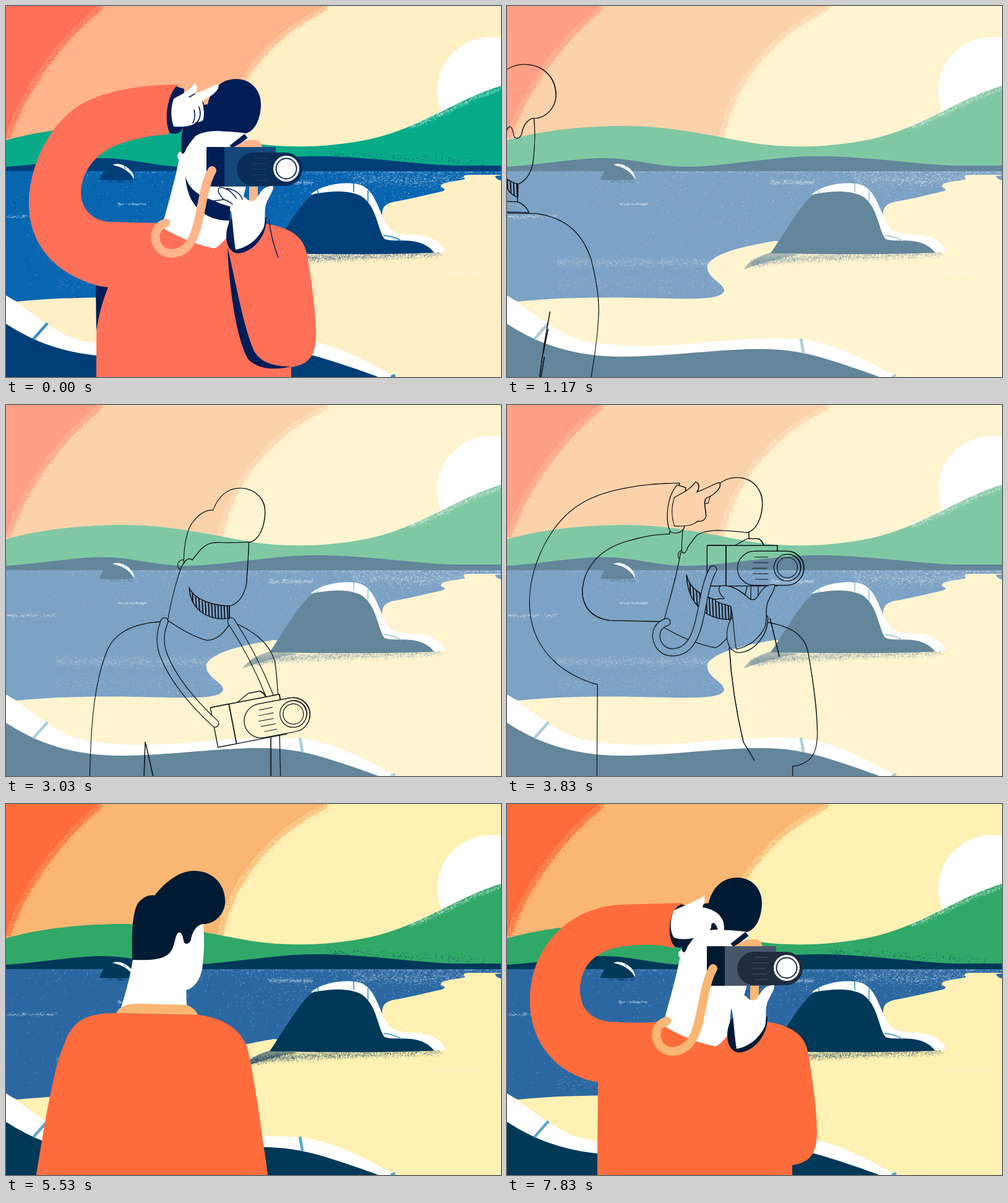
Animation, 800 px wide and 600 px high, one loop 8 s. Source, as an HTML page with a canvas:

```html
<!DOCTYPE html>
<html lang="en">
<head>
<meta charset="utf-8">
<title>Photographer by the bay</title>
<style>
html, body { margin: 0; width: 100%; height: 100%; overflow: hidden; background: #fff1b3; }
canvas { display: block; width: 100vw; height: 100vh; }
</style>
</head>
<body>
<canvas id="stage" width="800" height="600"></canvas>
<script>
const W = 800, H = 600, LOOP = 8000;

const looks = {
  finished: { red: '#ff7058', orange: '#ffb48a', cream: '#ffefc4', green: '#08ab88', navy: '#003e78', sea: '#0865b0',
    tick: '#3a8fc4', hair: '#001d56', grip: '#001d56', body: '#15487b', lens: '#0a2c58', details: true },
  sketch: { red: '#ff9f85', orange: '#fcd2ab', cream: '#fff4d0', green: '#80c8a4', navy: '#63869b', sea: '#7ca2c5',
    tick: '#a9cfd8', outline: true },
  flat: { red: '#ff6c3c', orange: '#fab673', cream: '#fff1b3', green: '#30a868', navy: '#003858', sea: '#2b68a2',
    tick: '#5ba6cb', hair: '#001b33', grip: '#001a30', body: '#47566b', lens: '#202b3d' }
};

const INK = '#0b0f14';
const makeCanvas = () => Object.assign(document.createElement('canvas'), { width: W, height: H });
const lerp = (a, b, t) => a + (b - a) * t;
const smooth = t => t * t * (3 - 2 * t);
const NUMBER = /-?\d+(\.\d+)?/g;

function mix(a, b, t) {
  const target = b.match(NUMBER);
  let i = 0;
  return a.replace(NUMBER, n => lerp(+n, +target[i++], t).toFixed(2));
}
function shift(path, dx, dy) {
  let i = 0;
  return path.replace(NUMBER, n => +n + (i++ % 2 ? dy : dx));
}

/* ---------- landscape ---------- */

function paintLandscape(look) {
  const canvas = makeCanvas(), c = canvas.getContext('2d');
  let seed = 7;
  const rand = () => (seed = (seed * 16807) % 2147483647) / 2147483647;
  const bell = () => rand() + rand() + rand() - 1.5;
  const fill = (color, d) => { c.fillStyle = color; c.fill(new Path2D(d)); };
  const line = (color, width, d) => { c.strokeStyle = color; c.lineWidth = width; c.stroke(new Path2D(d)); };
  const dot = (x, y, s) => c.fillRect(x, y, s, s);

  function edgeGrain(color, n, spread, size, [x0, y0, x1, y1, x2, y2, x3, y3]) {
    c.fillStyle = color;
    for (let i = 0; i < n; i++) {
      const t = rand(), u = 1 - t;
      const at = (a, b, d, e) => u * u * u * a + 3 * u * u * t * b + 3 * u * t * t * d + t * t * t * e;
      dot(at(x0, x1, x2, x3) + bell() * spread, at(y0, y1, y2, y3) + bell() * spread, size);
    }
  }
  function patch(color, n, x, y, w, h) {
    c.fillStyle = color;
    for (let i = 0; i < n; i++) c.fillRect(x + w * rand(), y + h * (.5 + bell() / 3), 1 + rand() * 2, 1);
  }
  // a solid area whose edge fades through a half-tone band into grain
  function softEdge(color, area, edge) {
    const [x, y, ...rest] = edge;
    fill(color, area);
    line(color + '88', 13, `M${x},${y}C${rest}`);
    edgeGrain(color + 'aa', 1300, 9, 1.3, edge);
  }

  c.fillStyle = look.cream;
  c.fillRect(0, 0, W, H);
  softEdge(look.orange, 'M0,0 H515 C430,40 360,115 341,214 L340,260 H0Z', [518, 0, 433, 40, 363, 115, 344, 214]);
  softEdge(look.red, 'M0,0 H148 C85,50 25,130 0,207Z', [152, 0, 89, 50, 28, 130, 0, 213]);

  fill('#fff', 'M697,137 a87,87 0 1 1 174,0 a87,87 0 1 1 -174,0Z');
  fill(look.green, 'M0,217 C60,200 130,194 190,194 C270,194 340,212 400,222 C460,231 530,228 590,215 C670,197 730,150 800,129 V266 H0Z');
  edgeGrain('rgba(255,255,255,.35)', 550, 5, 1.3, [650, 196, 700, 178, 740, 152, 800, 132]);
  if (!look.outline) edgeGrain(look.navy + '88', 160, 8, 1.3, [520, 238, 600, 243, 680, 246, 770, 254]);
  fill(look.navy, 'M0,260 C60,256 110,246 155,246 C205,246 240,260 290,260 C350,260 430,243 500,243 C580,243 640,254 720,258 L800,258 V268 H0Z');

  c.fillStyle = look.sea;
  c.fillRect(0, 267, W, 225);
  c.fillStyle = 'rgba(255,255,255,.3)';
  for (let i = 0; i < 1600; i++) dot(W * Math.sqrt(rand()), 268 + 205 * rand() ** 3, 1 + rand() * .6);
  for (let i = 0; i < 600; i++) dot(W * rand(), 268 + 205 * rand(), 1);
  const foam = 'rgba(255,255,255,.3)';
  patch(foam, 120, 0, 336, 80, 8);
  patch(foam, 80, 180, 317, 46, 6);
  patch(foam, 200, 425, 279, 70, 12);
  patch('rgba(255,255,255,.13)', 1500, 80, 401, 260, 27);
  patch('rgba(255,255,255,.13)', 500, 80, 427, 260, 45);
  patch(foam, 700, 560, 264, 230, 34);

  fill(look.cream, 'M800,273 H748 Q735,273 742,280 C728,284 700,284 703,293 Q714,297 704,300 C685,304 655,312 625,317 C606,322 607,333 609,348 L560,390 L432,380 C402,386 342,394 324,418 C320,440 350,447 351,460 C349,474 310,474 260,473 C160,470 80,471 18,478 L0,470 V600 H800Z');
  fill(look.sea, 'M790,275 L800,274 V282 Q793,281 790,275Z');
  patch('rgba(255,255,255,.22)', 260, 560, 490, 200, 75);
  patch('rgba(255,255,255,.3)', 90, 690, 427, 80, 8);

  fill(look.navy + '88', 'M382,426 C396,408 414,402 430,398 L470,402 Q420,412 382,426Z');
  edgeGrain(look.navy + '55', 2200, 7, 1.2, [395, 416, 460, 404, 560, 407, 700, 399]);
  fill('#fff', 'M493,304 C510,290 540,285 560,287 C600,288 599,335 622,362 C638,372 660,367 682,373 Q702,380 711,397 L690,399 L600,380 L500,310Z');
  fill(look.navy, 'M426,400 C450,365 476,318 497,304 C525,299 555,297 575,308 C600,325 600,362 612,377 C625,381 640,378 655,380 Q680,383 692,399 Q590,403 426,400Z');
  line(look.tick, 2, 'M562,287 V301 M585,298 V317 M610,371 Q626,372 639,380 M503,297 L505,303');

  fill(look.navy, 'M151,281 C157,262 168,257 180,257 Q200,262 206,281 Q180,283 151,281Z');
  fill('#fff', 'M172,257 Q180,253 191,258 Q207,267 207,280 Q197,262 172,257Z');
  line(look.tick, 1.5, 'M191,258 L193,264');
  patch(look.navy, 25, 165, 281, 40, 6);

  fill('#fff', 'M0,468 C30,486 72,524 112,538 C165,554 260,551 330,543 C400,537 450,535 490,541 C540,550 590,578 630,600 H0Z');
  fill(look.navy, 'M0,514 C40,540 95,565 175,567 C240,568 320,558 370,556 C430,552 470,557 510,569 C550,581 580,592 602,600 H0Z');
  line(look.tick, 4.5, 'M67,513 L44,539 M475,538 L479,561 M622,600 L629,597');
  return canvas;
}

/* ---------- poses: every part keeps one command list so its numbers can be mixed ---------- */

const walk = {
  torso: 'M42,640 C62,520 75,430 95,385 C108,350 130,338 178,338 L310,341 C350,346 378,362 390,395 C400,440 409,500 415,545 C418,565 421,585 423,602 L428,640Z',
  face: 'M184,335 C195,300 203,270 206,240 L240,190 L318,190 C321,220 320,240 317,265 C314,285 303,298 291,301 L292,335 Q270,337 250,337 Q210,337 184,335Z',
  hair: 'M204,252 C203,215 203,180 212,162 C220,150 232,146 240,148 C255,128 280,107 305,108 C335,109 354,130 354,158 C353,180 335,195 318,194 C306,196 300,210 299,218 C297,228 288,228 287,222 C285,210 282,205 277,209 C272,216 273,230 265,240 C255,252 235,253 204,252Z',
  collar: 'M178,338 C182,328 195,323 215,323 L292,325 Q305,330 310,341Z',
  beard: 'M270,288 C275,294 285,299 293,301 L293,322 C284,320 272,310 270,288Z',
  folds: 'M345,502 Q334,560 328,610 M336,575 L330,610 M342,530 L334,570',
  ear: '270,250'
};
const stride = {
  ...walk,
  torso: 'M55,640 C50,520 65,430 95,385 C108,350 130,342 178,342 L322,344 C365,350 395,370 411,418 C419,450 424,480 423,505 C421,550 416,575 411,608 L407,640Z'
};
const turned = {
  torso: 'M154,602 C157,500 165,430 185,390 C200,360 215,350 245,350 L375,356 C405,366 425,390 432,425 C437,470 443,520 446,550 C447,570 449,590 450,602 L450,602Z',
  face: 'M257,345 C262,310 268,290 276,250 L305,200 L383,208 C384,240 383,260 381,285 C378,305 368,318 352,320 L353,350 Q330,350 305,350 Q280,350 257,345Z',
  hair: 'M275,245 C275,215 281,190 290,180 C300,167 312,160 322,162 C330,140 345,126 365,126 C390,126 406,145 405,165 C404,190 395,208 382,212 C365,213 355,213 345,213 C335,213 325,212 318,214 C310,216 303,222 298,228 C294,234 291,236 288,241 C284,238 280,238 275,245Z',
  collar: 'M243,350 C246,344 253,340 262,340 L353,344 Q368,349 378,357Z',
  beard: 'M284,288 C293,307 322,317 349,317 L349,337 C315,342 286,322 284,288Z',
  folds: 'M225,545 Q224,570 223,602 M226,548 L238,602 M428,535 L428,602',
  ear: '279,250',
  strap: 'M256,350 C250,400 248,440 258,490 C270,550 300,620 338,665',
  backStrap: 'M364,352 C390,420 410,520 426,630',
  camera: '331,650,-14,.95'
};
const chest = {
  ...turned,
  torso: 'M136,602 C138,520 142,450 165,395 C180,365 210,354 250,351 L362,350 C400,365 425,385 434,415 C439,450 441,500 442,550 C442,570 443,590 443,602 L443,602Z',
  face: 'M262,348 C268,315 274,290 284,262 L318,209 L392,218 C391,250 389,270 388,290 C383,312 372,322 360,325 L360,355 Q345,379 325,380 Q300,374 262,348Z',
  hair: shift(turned.hair, 13, 9),
  beard: 'M296,296 C305,315 335,325 361,325 L361,345 C325,350 298,330 296,296Z',
  ear: '286,259',
  strap: 'M256,350 C250,365 247,385 255,405 C268,440 300,480 338,515',
  backStrap: 'M364,350 C390,390 410,430 426,470',
  camera: '331,490,-11,.95',
  arm: 'M260,370 C230,370 200,380 185,395 C165,420 155,470 155,500 C160,530 170,540 180,540 L220,500 L250,400 C240,400 230,400 225,400 C220,400 218,405 215,410 C220,410 225,405 235,400 C245,395 255,390 260,390Z'
};
const settled = {
  torso: 'M146,602 C146,550 147,470 147,440 C150,380 190,353 250,352 L420,352 C455,358 480,370 486,400 C495,450 501,500 501,530 C501,565 490,580 461,584 L461,602Z',
  face: 'M252,358 C260,325 272,290 281,240 L308,198 L390,206 C391,230 391,260 388,290 C383,320 372,330 362,332 L358,373 Q345,389 337,392 Q295,384 252,358Z',
  hair: 'M283,237 C283,215 284,200 290,185 C300,172 310,162 326,160 C330,140 345,119 372,119 C398,119 413,140 412,162 C411,185 402,203 388,207 C370,204 355,204 340,203 C320,204 308,208 304,214 C298,222 295,226 292,230 C290,236 289,238 286,240 C285,240 284,239 283,237Z',
  collar: shift(turned.collar, 3, 2),
  beard: 'M290,275 C296,302 325,315 362,320 L362,347 C325,348 292,325 290,275Z',
  folds: 'M359,392 Q364,470 382,545 M382,545 L400,575 M425,345 L440,407',
  ear: '285,243',
  strap: 'M258,351 C230,360 240,400 267,400 C320,400 308,310 333,266',
  backStrap: 'M400,314 C400,305 400,300 400,288',
  camera: '323,230,0,1',
  arm: 'M283,160 C240,161 215,162 180,163 C90,170 37,240 37,318 C37,390 85,440 148,450 L210,450 L250,354 C220,353 190,354 165,352 C130,348 118,325 118,300 C119,260 145,235 190,230 C220,226 245,227 270,233Z',
  cuff: 'M282,162 C260,170 257,220 272,231 C285,235 294,230 296,218 L292,165Z',
  hand: 'M270,172 C285,165 305,157 318,149 C322,155 318,160 316,167 C325,169 338,172 345,182 C350,188 351,195 351,205 C345,212 343,208 341,204 C337,190 332,190 330,196 C332,215 285,223 270,216 C262,205 264,185 270,172Z'
};
const lifted = {
  ...settled,
  arm: 'M300,275 C260,285 215,305 175,325 C100,350 45,390 44,430 C45,480 85,505 148,500 L210,460 L250,354 C230,356 215,360 200,365 C190,372 185,375 185,378 C190,378 200,376 215,370 C245,350 275,345 305,335Z',
  cuff: shift(settled.cuff, 22, 110),
  hand: shift(settled.hand, 25, 108)
};
const scratch = {
  ...settled,
  hair: shift(settled.hair, 0, -1),
  camera: '324,228,0,1',
  arm: 'M278,127 C230,127 160,135 120,160 C70,190 37,260 37,320 C37,390 85,435 148,452 L210,452 L250,351 C220,350 190,350 165,349 C135,345 121,325 121,300 C124,262 150,230 200,218 C225,211 240,209 262,208Z',
  cuff: 'M275,130 C258,150 256,190 265,205 C277,210 288,202 286,192 L288,134Z',
  hand: 'M271,150 C285,142 297,137 305,125 C312,128 309,138 305,142 C320,137 335,128 343,126 C347,133 335,145 322,150 C316,155 320,165 321,180 C318,188 312,188 308,187 C302,194 290,196 271,195 C266,180 266,165 271,150Z'
};

const poseKeys = [[0, walk], [300, stride], [700, walk], [1333, walk], [1633, turned], [1933, turned], [2133, chest],
  [2633, lifted], [2733, lifted], [2933, scratch], [3133, settled], [3333, settled], [3467, scratch], [3600, settled], [3800, settled]];
const offsetKeys = [[0, -408, -4], [300, -276, -13], [560, -146, 0], [700, -76, -13], [860, 0, 0],
  [1030, 43, 12], [1333, 43, 12], [1633, 0, 0], [3800, 0, 0]];

function span(keys, p) {
  let i = 1;
  while (i < keys.length - 1 && p >= keys[i][0]) i++;
  const a = keys[i - 1], b = keys[i];
  return [a, b, Math.min(1, (p - a[0]) / (b[0] - a[0]))];
}

/* ---------- figure ---------- */

const layer = makeCanvas(), g = layer.getContext('2d');
const supportHand = 'M371,395 C366,360 366,338 362,326 C350,322 338,320 337,316 C342,314 350,316 352,314 C344,306 340,298 346,294 C360,292 375,300 388,312 C395,318 400,318 405,312 C412,302 415,292 432,292 C433,300 424,310 420,322 C417,335 420,345 417,358 C408,378 390,392 371,395Z';
const supportCuff = 'M366,343 C352,358 351,398 374,401 C400,400 422,372 421,343Z';

function ink(d, width = 1.2) {
  g.strokeStyle = INK;
  g.lineWidth = width;
  g.stroke(d);
  g.save();
  g.translate(1.2, -.9);
  g.rotate(.002);
  g.lineWidth = width * .5;
  g.stroke(d);
  g.restore();
}
function erase(draw) {
  g.globalCompositeOperation = 'destination-out';
  draw();
  g.globalCompositeOperation = 'source-over';
}
// Several paths merge into one silhouette, so a sketch shows the outer contour only.
function shape(look, color, ...paths) {
  const parts = paths.map(p => new Path2D(p));
  g.fillStyle = color || INK;
  if (!look.outline) return parts.forEach(d => g.fill(d));
  parts.forEach(d => ink(d, 2.4));
  erase(() => parts.forEach(d => g.fill(d)));
}
function band(look, color, path) {
  const d = new Path2D(path);
  g.lineCap = 'round';
  g.strokeStyle = look.outline ? INK : color;
  g.lineWidth = look.outline ? 13 : 14;
  g.stroke(d);
  g.lineWidth = 10.6;
  if (look.outline) erase(() => g.stroke(d));
}
function disc(x, y, r) {
  const d = new Path2D();
  d.arc(x, y, r, 0, 7);
  return d;
}

function drawBeard(look, path) {
  if (look.details) return shape(look, look.hair, path);
  if (!look.outline) return;
  const d = new Path2D(path);
  ink(d);
  g.save();
  g.clip(d);
  let hatch = '';
  for (let x = 240; x < 400; x += 5) hatch += `M${x},280 l4,75`;
  ink(new Path2D(hatch), 1.6);
  g.restore();
}

function drawCamera(look, [x, y, angle, scale]) {
  g.save();
  g.translate(x, y);
  g.rotate(angle * Math.PI / 180);
  g.scale(scale, scale);
  shape(look, look.orange, 'M44,0 L64,-11 H82 Q88,-8 90,0Z');
  shape(look, look.body, 'M0,0 H112 V64 H0Z');
  shape(look, look.grip, 'M0,0 H29 V64 H0Z');
  shape(look, look.lens, 'M76,9 H128 A27,27 0 0 1 128,63 H76 A27,27 0 0 1 76,9Z');
  g.strokeStyle = look.outline ? INK : look.body;
  g.lineWidth = 1;
  g.stroke(new Path2D('M76,18 h22 M74,27 h24 M72,36 h24 M74,45 h24 M78,54 h20'));
  shape(look, '#fff', disc(129, 35, 21));
  g.strokeStyle = look.outline ? INK : look.lens;
  g.lineWidth = look.outline ? 1.2 : 2;
  g.stroke(disc(129, 35, 16.5));
  g.restore();
}

function drawFigure(look, phase) {
  const p = phase < 1330 ? phase : Math.floor((phase + 5) / 66.667) * 66.667;
  const [a, b, t] = span(poseKeys, p);
  const [o, n, u] = span(offsetKeys, p);
  const dx = lerp(o[1], n[1], u), dy = lerp(o[2], n[2], u);
  const part = name => {
    const from = a[1][name] || b[1][name], to = b[1][name] || from;
    return mix(from, to, smooth(t));
  };
  const camera = p > 1940 ? part('camera').split(',').map(Number) : null;
  const raised = camera && camera[1] < 400;

  g.clearRect(0, 0, W, H);
  g.save();
  g.translate(dx, dy * .6);
  const body = [part('torso')];
  if (p > 2140) body.push(part('arm'));
  shape(look, look.red, ...body);
  if (look.outline) ink(new Path2D(part('folds')), 1.4);
  if (look.details) {
    shape(look, look.hair, 'M145,452 L165,455 C155,480 150,500 146,525Z');
    shape(look, look.hair, 'M358,390 C360,450 372,540 392,572 C410,590 440,588 461,583 C440,583 415,580 402,560 C385,525 372,450 358,390Z');
    g.strokeStyle = look.hair;
    g.lineWidth = 1.5;
    g.stroke(new Path2D('M425,345 Q428,375 440,407'));
  }
  g.translate(0, dy * .4);
  shape(look, '#fff', disc(...part('ear').split(',').map(Number), 8));
  shape(look, '#fff', part('face'));
  shape(look, look.hair, part('hair'));
  drawBeard(look, part('beard'));
  g.translate(0, -dy * .4);
  if (p < 1990) shape(look, look.orange, part('collar'));

  if (camera) {
    band(look, look.orange, part('backStrap'));
    if (raised && !look.outline) {
      g.lineCap = 'butt';
      g.lineWidth = 8;
      g.strokeStyle = look.hair;
      g.stroke(new Path2D('M364,229 L388,210'));
    }
    const drop = camera[1] - 229;
    g.save();
    g.translate(0, drop);
    if (raised) shape(look, look.hair, supportCuff);
    g.restore();
    drawCamera(look, camera);
    band(look, look.orange, part('strap'));
    if (raised) {
      g.save();
      g.translate(0, drop);
      shape(look, '#fff', supportHand);
      if (look.details) {
        g.lineWidth = 1.5;
        g.strokeStyle = look.hair;
        g.stroke(new Path2D('M362,326 C350,322 338,320 337,316 Q345,315 352,314 C344,306 340,298 346,294 Q362,296 372,312 M352,314 Q360,316 366,322 M357,296 Q378,300 382,314'));
      }
      g.restore();
    }
  }
  if (p > 2400) {
    shape(look, look.hair, part('cuff'));
    shape(look, '#fff', part('hand'));
    if (look.details) {
      const [hx, hy] = part('hand').match(NUMBER).slice(6, 8);
      g.save();
      g.translate(hx - 305, hy - 125);
      g.lineWidth = 1.6;
      g.strokeStyle = look.hair;
      g.stroke(new Path2D('M305,142 Q299,146 296,147 M318,155 Q323,172 319,186 M312,163 Q317,178 309,188 M304,168 Q307,180 302,189'));
      g.restore();
    }
  }
  g.restore();
}

/* ---------- playback ---------- */

const stage = document.getElementById('stage').getContext('2d');
const backdrops = {};
for (const name in looks) backdrops[name] = paintLandscape(looks[name]);

function sceneAt(t) {
  if (t < 870) return ['finished', t + 2930];
  if (t < 4670) return ['sketch', t - 870];
  return ['flat', t - 4670];
}
function render(t) {
  const [name, phase] = sceneAt(t);
  drawFigure(looks[name], phase);
  stage.drawImage(backdrops[name], 0, 0);
  stage.drawImage(layer, 0, 0);
}

const start = performance.now();
function tick() {
  render((performance.now() - start) % LOOP);
  requestAnimationFrame(tick);
}
tick();
</script>
</body>
</html>
```
